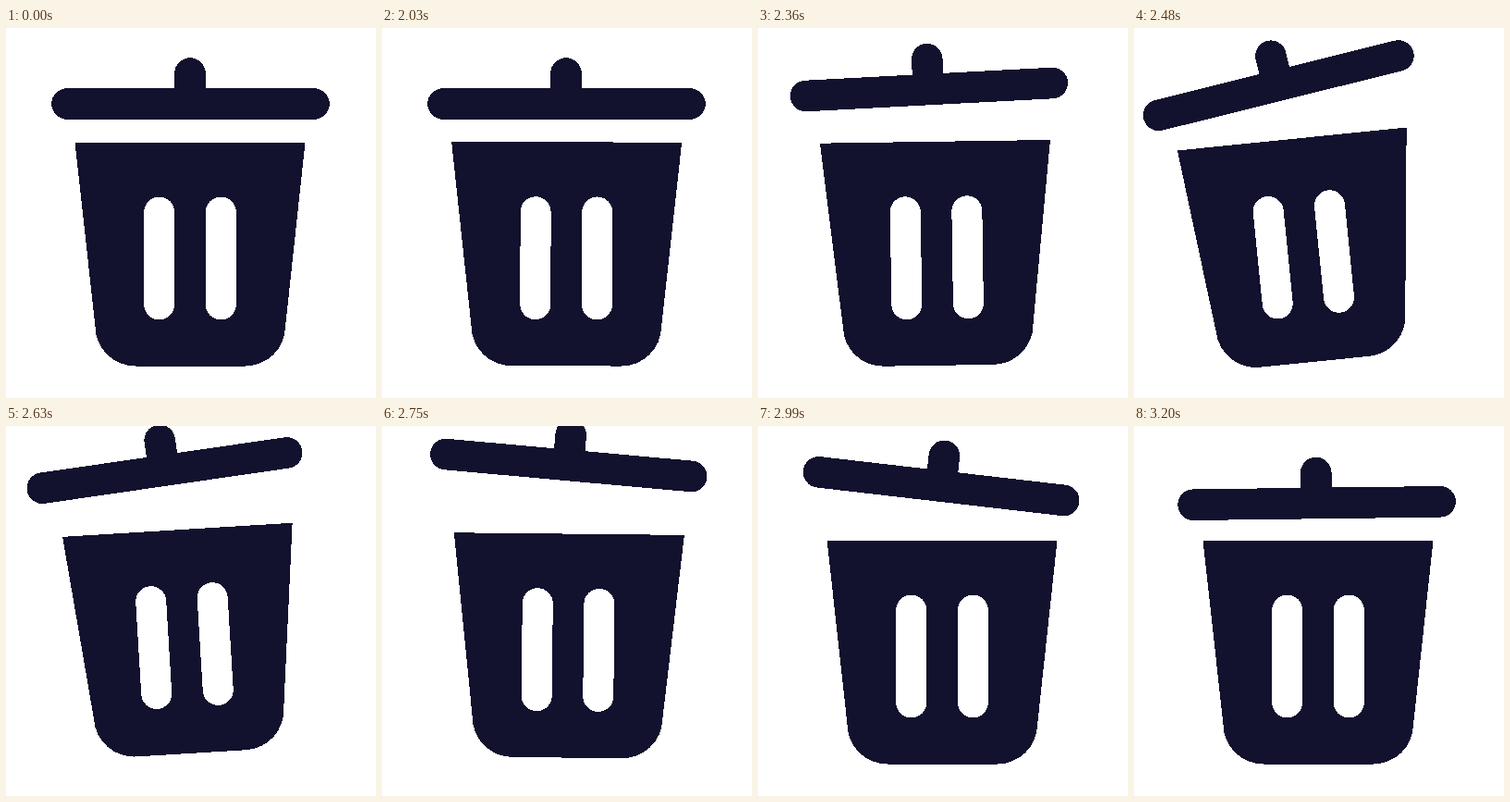
Animation, 400 px wide and 400 px high, one loop 3230 ms. Source, as an HTML page:

```html
<!DOCTYPE html>
<html lang="en">
<head>
<meta charset="utf-8">
<title>Trash can</title>
<style>
  html, body { margin: 0; height: 100%; overflow: hidden; background: #fff; }
  svg { display: block; width: 100vw; height: 100vh; shape-rendering: crispEdges; }
  line { stroke-linecap: round; stroke-width: 33; }
  #lid line { stroke: #12122e; stroke-width: 33.6; }
  #body path { fill: #12122e; }
  #body line { stroke: #fff; }
</style>
</head>
<body>
<svg viewBox="0 0 400 400">
  <g id="body">
    <path d="M74.5 123.5H323.5L302 323A43.5 43 0 0 1 258 365.5H140A43.5 43 0 0 1 96.5 323Z"/>
    <line x1="165.7" y1="199" x2="165.7" y2="299"/>
    <line x1="232.3" y1="199" x2="232.3" y2="299"/>
  </g>
  <g id="lid">
    <line x1="66" y1="82" x2="333" y2="82"/>
    <line x1="199" y1="49" x2="199" y2="82"/>
  </g>
</svg>
<script>
const LOOP = 3230, REST = 2030, STEP = 30;
const body = document.getElementById('body');
const lid = document.getElementById('lid');

const ease = u => (1 - Math.cos(Math.PI * Math.min(1, Math.max(0, u)))) / 2;

// Starts at 0 and eases to each [step, value] turning point in order.
const swing = (start, ...turns) => k => {
  let from = start, value = 0;
  for (const [to, target] of turns) {
    if (k <= from) break;
    value += (target - value) * ease((k - from) / (to - from));
    from = to;
  }
  return value;
};

const bodyTilt = swing(-.6, [5, 6], [16, -6], [26, 1.3], [32, 0]);
const bodyX = swing(-1, [12, -4], [16, -4], [20, 1], [34, 0]);
const lidTilt = swing(0, [5, 12.3], [16, -14.5], [29, 14.5], [35.5, -3.5], [40.5, 0]);
const lidX = swing(0, [5, 25.5], [16, -44.6], [27, 12], [35.5, -9], [40.5, 0]);
const lidY = swing(0, [6, -15.5], [11.5, -15.5], [24, -39.5], [39, 1.5], [40, 0]);

// The can rocks on its rounded corners, which lifts its middle, then hops once.
function bodyY(k) {
  const rock = 47 * Math.abs(Math.sin(bodyTilt(k) * Math.PI / 180));
  const air = Math.min(1, Math.max(0, (k - 15) / 12));
  return -rock - 9.1 * Math.sin(Math.PI * air);
}

function place(part, x, y, angle, pivotX, pivotY) {
  part.setAttribute('transform', `translate(${x} ${y}) rotate(${angle} ${pivotX} ${pivotY})`);
}

function draw(time) {
  const k = Math.max(-1, Math.floor((time % LOOP - REST) / STEP));
  place(body, bodyX(k), bodyY(k), bodyTilt(k), 199, 365);
  place(lid, lidX(k), lidY(k), lidTilt(k), 199.5, 82);
}

const start = performance.now();
function frame() {
  draw(performance.now() - start);
  requestAnimationFrame(frame);
}
frame();
</script>
</body>
</html>
```
